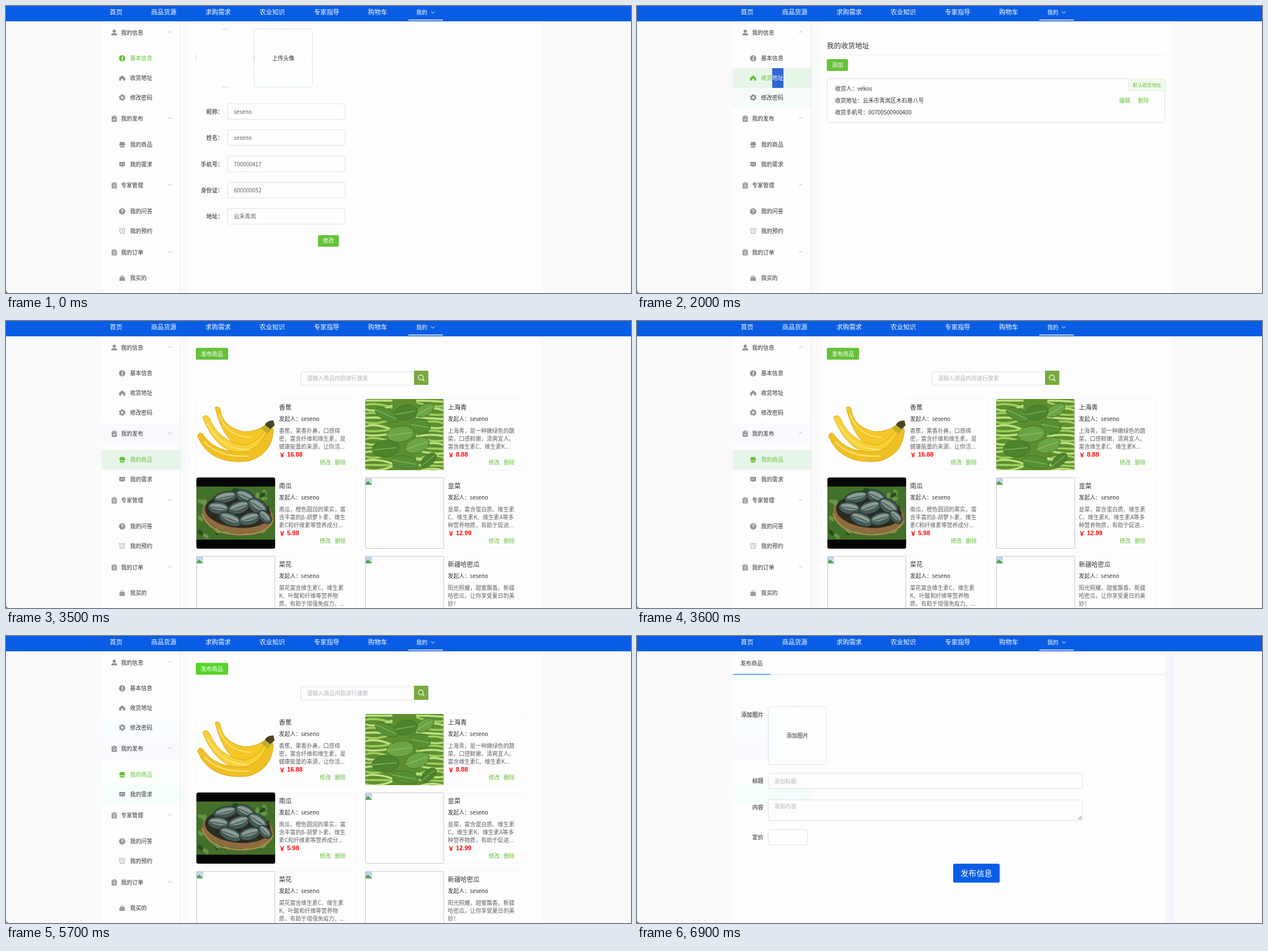
An HTML page that plays this animation: 1103 px wide and 508 px high, repeating every 8000 ms.

```html
<!DOCTYPE html>
<html lang="zh-CN">
<head>
<meta charset="utf-8">
<title>个人中心</title>
<style>
html, body { margin: 0; width: 100%; height: 100%; overflow: hidden; background: #f9faf9; }
svg { display: block; width: 100%; height: 100%; font-family: "Noto Sans CJK SC", "Noto Sans CJK", "Noto Sans", sans-serif; }
</style>
</head>
<body>
<svg id="stage" viewBox="0 0 1103 508"></svg>
<script>
const LOOP = 8000, STEP = 100;
const GREEN = '#67c23a', BLUE = '#085de4', DARK = '#303133', MID = '#606266', PALE = '#b0b3bb', EDGE = '#dcdfe6';
const USER = 'seseno', PAPER = '#fdfdfd';

// Text is placed by its left edge (or anchor) and its vertical centre.
const text = (x, y, s, fill = DARK, size = 9.8, extra = '') =>
  `<text x="${x}" y="${y + size * .38}" fill="${fill}" font-size="${size}" ${extra}>${s}</text>`;
const mid = (x, y, s, fill, size) => text(x, y, s, fill, size, 'text-anchor="middle"');
const label = (x, y, s) => text(x, y, s, MID, 9.8, 'text-anchor="end" font-weight="700"');
const rect = (x, y, w, h, fill, extra = '') =>
  `<rect x="${x}" y="${y}" width="${w}" height="${h}" fill="${fill}" ${extra}/>`;
const line = (d, stroke, w = 1) => `<path d="${d}" fill="none" stroke="${stroke}" stroke-width="${w}"/>`;
const shape = (d, fill) => `<path d="${d}" fill="${fill}"/>`;
const oval = (x, y, rx, ry, turn, fill, extra = '') =>
  `<ellipse rx="${rx}" ry="${ry}" fill="${fill}" transform="translate(${x} ${y}) rotate(${turn})" ${extra}/>`;
const at = (x, y, s, extra = '') => `<g transform="translate(${x} ${y})" ${extra}>${s}</g>`;
const field = (x, y, w, h = 27.5) => rect(x, y, w, h, PAPER, `rx="2.5" stroke="${EDGE}"`);
const button = (x, y, w, h, s, fill = GREEN, size = 9.8) =>
  rect(x, y, w, h, fill, 'rx="2.5"') + mid(x + w / 2, y + h / 2, s, '#fff', size);
const upload = (x, y, s, stroke = '#c3cdcf') =>
  rect(x, y, 102.5, 102.5, '#fcfefe', `rx="4" stroke="${stroke}" stroke-dasharray="2.2 1.6"`) +
  mid(x + 51.5, y + 51.5, s);

const clipboard = rect(-4.5, -4.5, 9, 10, 'currentColor', 'rx=".8"') + rect(-2.2, -5.8, 4.4, 2.6, 'currentColor', 'stroke="#fdfdfd" stroke-width=".6"');
const disc = '<circle r="5.6" fill="currentColor"/>';
const icons = {
  user: '<circle cy="-2.4" r="2.9" fill="currentColor"/>' + shape('M-5 5V3.6Q-5 1.2 -2.4 1.2H2.4Q5 1.2 5 3.6V5z', 'currentColor'),
  info: disc + '<circle cx=".8" cy="-2.8" r="1" fill="#fff"/>' + line('M-1-.6H.6L-.4 3.2H1', '#fff', 1.2),
  house: shape('M0-5L5.4-.2V4.6H1.6V1.2H-1.6V4.6H-5.4V-.2z', 'currentColor'),
  gear: '<circle r="3.4" fill="none" stroke="currentColor" stroke-width="2.6"/><circle r="5" fill="none" stroke="currentColor" stroke-width="1.8" stroke-dasharray="2.8 2.436"/>',
  check: clipboard + line('M-2.2 1L-.5 2.7L2.5-.6', '#fff', 1.1),
  list: clipboard + line('M-2.5-.8H2.5M-2.5 1.2H2.5M-2.5 3.2H2.5', '#fff', .8),
  shop: shape('M-3.8-4.8H3.8L5.2 0Q5 1.5 3.5 1.5H-3.5Q-5 1.5-5.2 0zM-4 2.4H4V5H-4z', 'currentColor'),
  chat: shape('M-5-4.5H5V3H1.4L0 5L-1.4 3H-5z', 'currentColor') + line('M-3-.6H-1.6M-.7-.6H.7M1.6-.6H3', '#fff', 1.3),
  ask: disc + line('M-1.7-1.3Q-1.6-3 0-3T1.7-1.4Q1.6-.4 0 .3V1.3M0 2.2V3.4', '#fff', 1.2),
  clock: '<circle cy=".3" r="4.2" fill="none" stroke="currentColor"/>' + line('M0-2V.6H2M-5.5-2.6Q-5.2-5-3-5.1M5.5-2.6Q5.2-5 3-5.1M-2.8 3.6L-4 5.4M2.8 3.6L4 5.4', 'currentColor', .9),
  bag: shape('M-4.2-2H4.2L5 5H-5z', 'currentColor') + line('M-2.2-1V-2.6Q-2-4.8 0-4.8T2.2-2.6V-1', 'currentColor') + line('M-2 0V1.2M2 0V1.2', '#fff', .9)
};

const groups = [['user', 47, '我的信息'], ['check', 199.5, '我的发布'], ['list', 317.5, '专家管理'], ['list', 436, '我的订单']];
// Icon, centre, caption, time it becomes active, time it stops.
const items = [
  ['info', 92.5, '基本信息', -1e4, 1400], ['house', 127.5, '收货地址', 1400, 2400],
  ['gear', 162, '修改密码', 2400, 3400], ['shop', 245.5, '我的商品', 3400, 1e5],
  ['chat', 280.5, '我的需求'], ['ask', 363.5, '我的问答'], ['clock', 398, '我的预约'], ['bag', 481.5, '我买的']
];
// Row top, height, then pairs of start time and tint.
const tints = [
  [110, 35, 1100, '#e7f5e9', 2400, PAPER],
  [145, 35, 900, '#f5fbf7', 2400, '#e7f5e9', 3400, PAPER, 5100, '#f8fdff'],
  [180, 40, 2800, '#fbf9fe'],
  [228, 35, 3200, '#ebf6ee', 3400, '#e7f5e9', 5100, '#fafefd', 5800, PAPER],
  [263, 35, 5100, '#f6fefd']
];

const ramp = (t, start) => Math.max(0, Math.min(1, (t - start + STEP) / 200));
const blend = (a, b, k) => `rgb(${a.map((v, i) => Math.round(v + (b[i] - v) * k))})`;
const LEAF = [103, 194, 58];

function rowTints(t) {
  return tints.map(([y, h, ...stops]) => {
    let fill = '';
    for (let i = 0; i < stops.length; i += 2) if (t >= stops[i]) fill = stops[i + 1];
    return fill && rect(169, y, 138, h, fill);
  }).join('');
}

function header() {
  const tabs = [[183, '首页'], [256, '商品货源'], [352, '求购需求'], [447.5, '农业知识'], [543.5, '专家指导'], [639, '购物车']];
  return rect(0, 0, 1103, 27, BLUE) + rect(0, 27, 1103, 1, '#e1e6ee') +
    tabs.map(([x, s]) => text(x, 11, s, '#fff', 11.2)).join('') +
    text(724, 11.5, '我的', '#fff') + line('M750 9.5L753.3 13L756.6 9.5', '#fff') + rect(710, 24, 61, 1.4, '#fff');
}

function sidebar(t) {
  let out = rect(169, 27, 138, 481, PAPER) + rowTints(t) + rect(307, 27, 1, 481, '#e8eaeb') + rect(321, 27, 625, 481, PAPER);
  for (const [icon, y, s] of groups)
    out += at(191, y, icons[icon], 'color="#909399"') + text(203, y, s) + line(`M286.3 ${y + .5}l3-3l3 3`, '#a8abb2', .9);
  for (const [icon, y, s, on, off] of items) {
    const k = on === undefined ? 0 : ramp(t, on) - ramp(t, off);
    out += at(205, y, icons[icon], `color="${blend([144, 147, 153], LEAF, k)}"`) + text(219, y, s, blend([48, 49, 51], LEAF, k));
  }
  if (t >= 1400 && t < 2400) out += rect(238.6, 110, 19.8, 35, '#2f65d0') + text(238.6, 127.5, '地址', '#fff');
  return out;
}

function profile() {
  const rows = [['昵称', USER], ['姓名', USER], ['手机号', '700000417'], ['身份证', '600000052'], ['地址', '云禾青岚']];
  return line('M381 41.2H393M381 143.4H393M335.7 86V98M437.3 86V98', '#c2c8cb', .8) + upload(438, 41, '上传头像') +
    rows.map(([name, value], i) => {
      const y = 173 + i * 46.4;
      return label(383, y + 14, name + '：') + field(391, y, 207.5) + text(402, y + 14, value, MID);
    }).join('') + button(550.5, 405.5, 37, 20.5, '修改');
}

function address() {
  return text(335, 70.5, '我的收货地址', DARK, 12.5) + rect(335, 86, 597, 1, '#eeeff2') + button(335, 94, 37.5, 21, '添加') +
    rect(335.5, 128.5, 596, 78, 'none', 'rx="4" stroke="#cacccb" stroke-dasharray="2.2 1.4"') +
    text(349.5, 146, '收货人：vekos') + text(349.5, 167, '收货地址：云禾市青岚区木石巷八号') + text(349.5, 188, '收货手机号：00700500900400') +
    rect(867.5, 128.5, 65, 21.5, '#f0f9eb', 'rx="2.5" stroke="#e1f3d8"') + text(875, 139.5, '默认收货地址', GREEN, 8.4) +
    text(851, 167.5, '编辑', GREEN) + text(884, 167.5, '删除', GREEN);
}

function password() {
  return ['原密码', '新密码', '确认新密码'].map((s, i) =>
    label(397, 69 + i * 46.3, s + '：') + field(404.5, 55 + i * 46.4, 208)).join('') + button(543, 194.3, 57, 20.5, '修改密码');
}

function bananas() {
  const skin = (d, fill) => `<path d="${d}" fill="${fill}" stroke="#c7930f" stroke-width=".7"/>`;
  return rect(0, 0, 139, 126, '#fefefe') +
    skin('M33 15Q40 12 42 18Q46 50 84 58Q106 58 122 46L134 54Q124 84 92 88Q50 86 33 15z', '#f5c827') +
    skin('M11 32Q18 26 23 34Q40 76 86 82Q112 76 124 48L135 54Q132 92 96 100Q36 100 11 32z', '#f8d137') +
    skin('M2 66Q6 54 14 66Q36 96 86 94Q118 84 126 50L136 54Q134 98 92 110Q24 118 2 66z', '#f0c022') +
    line('M40 28Q54 66 96 68M20 44Q44 90 94 90M14 76Q40 104 92 101', '#fbe27c', 2) +
    shape('M114 52L126 42L136 50L126 62z', '#c3ae2c') + shape('M121 46Q124 38 136 38L138 47L130 53z', '#4e4320');
}

function greens() {
  let out = rect(0, 0, 139, 126, '#5d8f30');
  for (let i = 0; i < 17; i++) {
    const y = 3 + i * 7.6, bend = 7 * Math.sin(i * 2.3);
    out += line(`M0 ${y}Q20 ${y - bend} 48 ${y + bend}M138 ${y + 2}Q115 ${y + bend} 90 ${y - bend}`, i % 2 ? '#9fce5c' : '#bfdf80', 3.6);
  }
  const leaves = [[38, 28, 22, 10, 25], [105, 20, 18, 10, -30], [72, 24, 20, 13, -10], [97, 48, 18, 13, 10], [62, 62, 24, 14, -8],
    [112, 108, 16, 9, -40], [70, 112, 24, 11, 10], [92, 82, 22, 13, -20], [36, 88, 24, 15, -5]];
  leaves.forEach(([x, y, rx, ry, turn], i) => {
    out += oval(x, y, rx, ry, turn, ['#568f34', '#6ba444', '#4b842d'][i % 3], 'stroke="#3b6a22" stroke-width=".8"') +
      `<g transform="translate(${x} ${y}) rotate(${turn})">${line(`M${-rx} 0H${rx * .8}`, '#a4ca72', .9)}</g>`;
  });
  return out + rect(137.5, 0, 1.5, 126, '#c9c6b5');
}

function gourds() {
  let seed = 7, out = rect(0, 0, 139, 126, '#050505') + rect(0, 16, 139, 94, '#42702a');
  const rnd = () => (seed = seed * 16807 % 2147483647) / 2147483647;
  for (let i = 0; i < 42; i++)
    out += oval(7 + rnd() * 125, 22 + rnd() * 82, 6, 3.5, rnd() * 180, i % 3 ? '#669544' : '#2a4a1c');
  out += oval(73, 66, 63, 33, 6, '#8f6b3e') + oval(73, 60, 58, 29, 6, '#2d2a20');
  const fruit = [[51, 35, 21, 10, -12], [86, 34, 18, 11, 25], [39, 54, 19, 11, 8], [75, 53, 20, 11, -18], [108, 51, 19, 12, 34],
    [60, 74, 21, 11, 22], [94, 73, 19, 11, -16], [121, 70, 14, 9, 45]];
  for (const [x, y, rx, ry, turn] of fruit)
    out += oval(x, y, rx, ry, turn, '#465a57', 'stroke="#1d2b27"') + oval(x, y - 2, rx * .8, ry * .5, turn, '#8b9c96') + oval(x, y, rx * .8, ry * .12, turn, '#54695f');
  return out + line('M10 64Q22 99 73 101T135 76', '#b18a52', 2.5);
}

const broken = rect(.5, .5, 138, 125, PAPER, 'rx="2" stroke="#c9c9c9"') +
  shape('M1 1H9L12 4V13H1z', '#c5daf5') + shape('M1 13V10L5 6L12 13z', '#55a44d') + line('M9 1V4H12M1 1V13', '#9aa5b1', .8);

const photos = [bananas(), greens(), gourds()];
const goods = [
  ['香蕉', '16.88', '香蕉，果香扑鼻，口感绵', '密，富含纤维和维生素，是', '健康能量的来源，让你活...'],
  ['上海青', '8.88', '上海青，是一种嫩绿色的蔬', '菜，口感鲜嫩，清爽宜人。', '富含维生素C、维生素K...'],
  ['南瓜', '5.98', '南瓜，橙色圆润的果实，富', '含丰富的β-胡萝卜素、维生', '素C和纤维素等营养成分...'],
  ['韭菜', '12.99', '韭菜，富含蛋白质、维生素', 'C、维生素K、维生素A等多', '种营养物质，有助于促进...'],
  ['菜花', '9.98', '菜花富含维生素C、维生素', 'K、叶酸和纤维等营养物', '质，有助于增强免疫力、...'],
  ['新疆哈密瓜', '18.88', '阳光照耀，甜蜜飘香。新疆', '哈密瓜，让你享受夏日的美', '妙！']
];

function card([name, price, ...lines], i) {
  const photo = photos[i] ? `<g clip-path="url(#round)">${photos[i]}</g>` : broken;
  return at(336 + i % 2 * 298, 138 + (i >> 1) * 139,
    rect(-.5, .5, 283, 125, PAPER, 'rx="3" stroke="#f3f4f5"') + photo +
    text(145.7, 15, name, DARK, 11.2) + text(145.7, 35, '发起人：' + USER) +
    lines.map((s, n) => text(145.7, 56 + n * 14, s, MID)).join('') +
    text(146, 98.5, '￥', '#f00', 10.6, 'font-weight="700"') +
    text(160, 98.2, price, '#f00', 10.9, 'font-weight="700" font-family="Liberation Sans, Arial, sans-serif"') +
    text(217.7, 112.5, '修改', GREEN) + text(244.2, 112.5, '删除', GREEN));
}
const cards = '<clipPath id="round"><rect width="139" height="126" rx="3.5"/></clipPath>' + goods.map(card).join('');

function shop(t) {
  return button(335, 47.5, 57, 21, '发布商品', blend(LEAF, [87, 213, 44], ramp(t, 5600))) +
    field(520.5, 90, 200, 23.5) + text(531, 101.5, '请输入商品内容进行搜索', PALE) +
    rect(720, 88, 25.3, 25, '#79a93d') + '<circle cx="732" cy="100" r="4.3" fill="none" stroke="#fff" stroke-width="1.2"/>' +
    line('M735 103L738.5 106.5', '#fff', 1.3) + cards;
}

function publish(t) {
  const hover = t >= 6700 && t < 6900;
  return rect(169, 27, 763, 481, PAPER) + rect(932, 27, 14, 481, '#f4f6fb') + rowTints(t) +
    text(182.5, 48, '发布商品') + rect(169, 68, 763, 1, '#dfe2e7') + rect(169, 67, 66.5, 1.6, '#409eff') +
    label(223, 139, '添加图片') + upload(231.5, 125, '添加图片', hover ? '#409eff' : undefined) +
    label(223, 256.5, '标题') + field(231.5, 243, 554.5, 27) + text(242, 257, '添加标题', PALE) +
    label(223, 303.5, '内容') + field(231.5, 290, 554.5, 36.5) + text(242, 301, '添加内容', PALE) +
    line('M778.5 325L784.5 319M782 325L784.5 322.5', '#555', 1) +
    label(223, 356, '定价') + field(231.5, 342.5, 69, 27) + button(558, 403, 82, 33.5, '发布信息', BLUE, 14);
}

function scene(t) {
  const page = t < 1400 ? profile : t < 2400 ? address : t < 3400 ? password : shop;
  return (t < 5800 ? sidebar(t) + page(t) : publish(t)) + header() + shape('M0 503Q1 507 5 508H0z', '#8c8c8c');
}

const stage = document.getElementById('stage');
let shown = -1;
function tick(now) {
  const t = Math.floor(now % LOOP / STEP) * STEP;
  if (t !== shown) {
    stage.innerHTML = scene(t);
    shown = t;
  }
  requestAnimationFrame(tick);
}
tick(performance.now());
</script>
</body>
</html>
```
